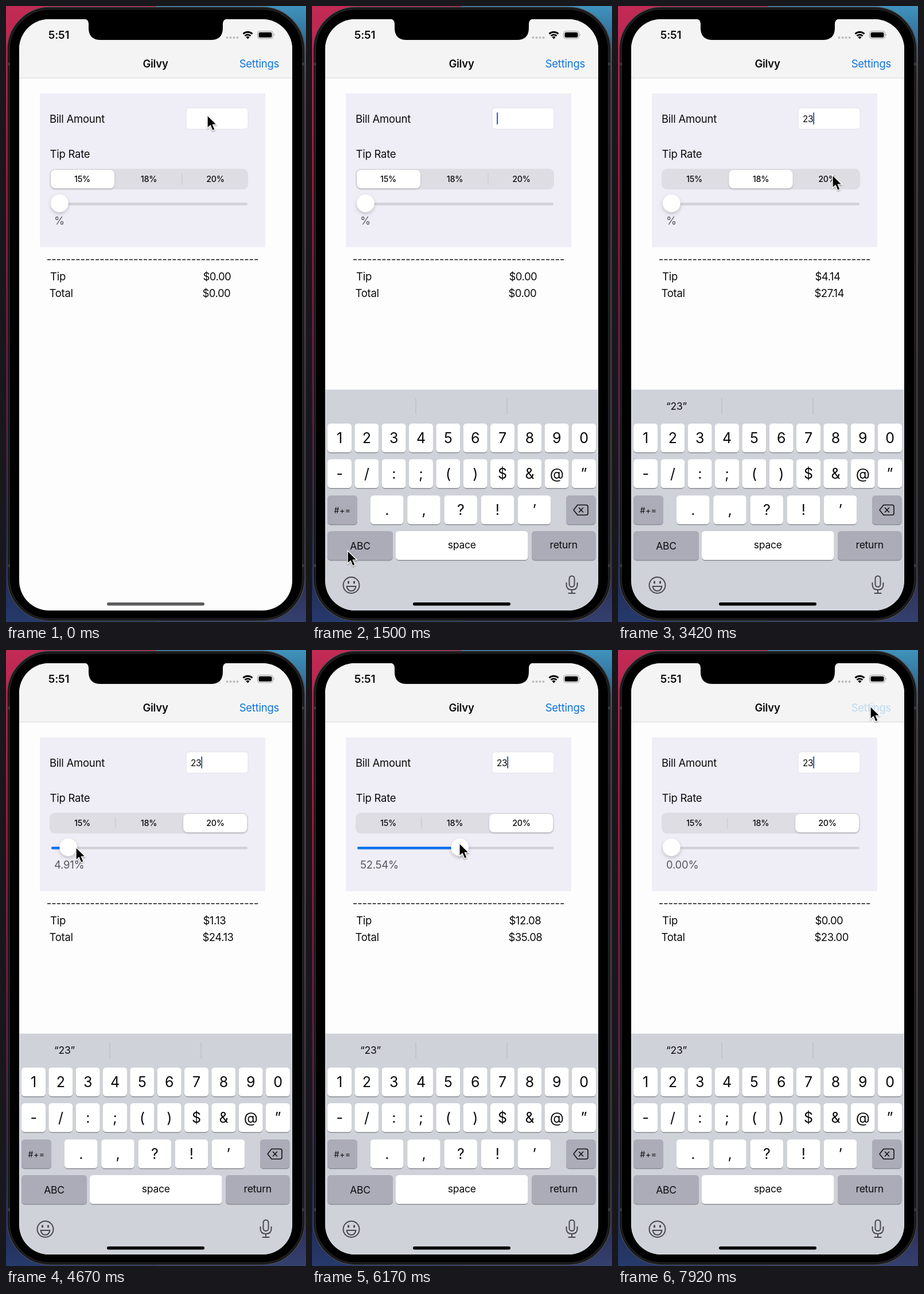
Animation of 523x1071 px, one loop 8000 ms. Source, as an HTML page:

```html
<!DOCTYPE html>
<html lang="en">
<head>
<meta charset="utf-8">
<title>Tip calculator</title>
<style>
  html, body { margin: 0; width: 100%; height: 100%; overflow: hidden; background: #000; }
  svg { display: block; width: 523px; height: 1071px; }
  text { font: 18.5px Inter, sans-serif; letter-spacing: -.25px; fill: #0b0b0d; white-space: pre; }
  .mid { text-anchor: middle; }
  .bold { font-weight: 600; }
  .money { letter-spacing: -.5px; }
  .seg { font-size: 14.3px; font-weight: 500; }
  .glyph { font-size: 25px; }
  .word { font-size: 17.5px; }
  .small { font-size: 14px; letter-spacing: .5px; }
  .line { fill: none; stroke: #48494d; stroke-width: 2; stroke-linecap: round; stroke-linejoin: round; }
</style>
</head>
<body>
<svg viewBox="0 0 523 1071">
  <defs>
    <linearGradient id="left" x2="0" y2="1">
      <stop offset="0" stop-color="#c22b55"/><stop offset=".3" stop-color="#a50f35"/>
      <stop offset=".6" stop-color="#5a1236"/><stop offset=".85" stop-color="#1c1c40"/>
      <stop offset="1" stop-color="#263a6c"/>
    </linearGradient>
    <linearGradient id="right" x2="0" y2="1">
      <stop offset="0" stop-color="#3f93bd"/><stop offset=".08" stop-color="#2b5c85"/>
      <stop offset=".13" stop-color="#8c1839"/><stop offset=".6" stop-color="#6a1438"/>
      <stop offset=".9" stop-color="#2a2850"/><stop offset="1" stop-color="#34406e"/>
    </linearGradient>
    <clipPath id="screen"><rect x="23" y="23" width="476" height="1028" rx="52"/></clipPath>
    <filter id="soft" x="-50%" y="-50%" width="200%" height="200%">
      <feDropShadow dx="0" dy="3" stdDeviation="3" flood-opacity=".2"/>
    </filter>
    <filter id="pillShadow" x="-20%" y="-30%" width="140%" height="160%">
      <feDropShadow dx="0" dy="1.5" stdDeviation="1.5" flood-opacity=".22"/>
    </filter>
    <filter id="arrowShadow" x="-50%" y="-50%" width="200%" height="200%">
      <feDropShadow dx="0" dy="1.5" stdDeviation="1.2" flood-opacity=".35"/>
    </filter>
  </defs>

  <rect width="262" height="1071" fill="url(#left)"/>
  <rect x="261" width="262" height="1071" fill="url(#right)"/>
  <rect x="2.5" y="2" width="518" height="1067" rx="74" fill="#000" stroke="#48484b" stroke-width="1.5"/>
  <rect x="5.5" y="5" width="512" height="1061" rx="71" fill="none" stroke="#1f1f21" stroke-width="3"/>
  <path d="M2 101h5M516 101h5M2 973h5M516 973h5" stroke="#39393c" stroke-width="5"/>

  <g clip-path="url(#screen)">
    <rect x="23" y="23" width="476" height="1028" fill="#fefdfe"/>
    <rect x="23" y="23" width="476" height="102" fill="#f5f4f5"/>
    <path d="M23 125h476" stroke="#d3d2d4"/>
    <path d="M135 22q9 1 9 9v7q0 21 21 21h192q21 0 21-21v-7q0-8 9-9z"/>
    <text class="mid bold" x="92" y="57" style="font-size:19px">5:51</text>
    <text class="mid bold" x="260.5" y="107">Gilvy</text>
    <text id="settings" x="476" y="107" text-anchor="end">Settings</text>
    <path d="M385.500 55h20" stroke="#bcbbbd" stroke-width="4" stroke-linecap="round" stroke-dasharray="0 6"/>
    <path d="M413.500 48.500a11.500 11.500 0 0 1 16 0M416.500 52a7 7 0 0 1 10 0" fill="none" stroke="#000" stroke-width="2.800"/>
    <path d="M421.500 57.500l-3-3.200a4.300 4.300 0 0 1 6 0z"/>
    <rect x="438.500" y="43.700" width="27" height="13" rx="4" fill="none" stroke="#98989a"/>
    <rect x="440.500" y="45.700" width="23" height="9" rx="2.500"/>
    <path d="M467 48q2 2 0 4z" fill="#98989a"/>

    <rect x="59" y="152" width="393" height="267.500" fill="#efedf5"/>
    <text x="76" y="203">Bill Amount</text>
    <rect x="314" y="177" width="108" height="37" rx="5.500" fill="#fff" stroke="#e2e0e7"/>
    <text id="bill" x="322" y="201.500" style="font-size:15.300px"></text>
    <rect id="caret" y="185" width="2.200" height="21" rx="1" fill="#3e62c6"/>
    <text x="76.500" y="264">Tip Rate</text>
    <rect x="76" y="283" width="346" height="36" rx="9" fill="#dedde4"/>
    <path id="sep0" d="M191 291v20" stroke="#c5c4cc"/>
    <path id="sep1" d="M307 291v20" stroke="#c5c4cc"/>
    <rect id="pill" y="285" width="111" height="32" rx="8" fill="#fff" filter="url(#pillShadow)"/>
    <text class="mid seg" x="133" y="306">15%</text>
    <text class="mid seg" x="249" y="306">18%</text>
    <text class="mid seg" x="365" y="306">20%</text>
    <rect x="79" y="342" width="342" height="4.500" rx="2.200" fill="#d2d1d8"/>
    <rect id="fill" x="79" y="342" height="4.500" rx="2.200" fill="#0b74ee"/>
    <circle id="knob" cy="343" r="15.300" fill="#fff" filter="url(#soft)"/>
    <text id="percent" x="84" y="380" style="fill:#57565c"></text>
    <path d="M72 441h369" stroke="#111" stroke-width="1.700" stroke-dasharray="6 2.400"/>
    <text x="77" y="477">Tip</text>
    <text x="75.500" y="506">Total</text>
    <text id="tip" class="money" x="343.500" y="477"></text>
    <text id="total" class="money" x="342.500" y="506"></text>

    <g id="keyboard">
      <rect x="23.500" y="667" width="475" height="390" fill="#cfd2d9"/>
      <path d="M181 682v28M340 682v28" stroke="#b5b8bf"/>
      <g id="letters"></g>
      <g id="symbols"></g>
      <text id="guess" class="mid word" x="102" y="702"></text>
      <g id="shared"></g>
      <g class="line">
        <path d="M463 867.500h15q3 0 3 3v11.500q0 3-3 3h-15l-7-8.700zM465.500 872.500l7 7.500M472.500 872.500l-7 7.500" style="stroke:#111;stroke-width:1.600"/>
        <circle cx="68.500" cy="1007" r="14"/>
        <path d="M60.500 1009h16q-1.500 8-8 8t-8-8z"/>
        <path d="M63.500 1001v2M73.500 1001v2" stroke-width="3"/>
        <rect x="448.500" y="991" width="9" height="19" rx="4.500"/>
        <path d="M443.500 1003v3q0 9 9.500 9t9.500-9v-3M453 1015v6M447.500 1021h11"/>
      </g>
      <g id="popup">
        <path d="M-29 664q0-8 8-8h42q8 0 8 8v38q0 8-5 13q-3 4-3 11v44q0 6-6 6h-30q-6 0-6-6v-44q0-7-3-11q-5-5-5-13z" fill="#fff" filter="url(#soft)"/>
        <text id="popupText" class="mid" y="703" style="font-size:36px"></text>
      </g>
    </g>
    <rect id="home" x="176" y="1037" width="170" height="5.500" rx="2.700"/>
  </g>
  <path id="cursor" d="M0 0v22.500l5.200-4.800 3.700 8.800 4.200-1.800-3.700-8.500h7z" stroke="#fff" stroke-width="1.300" filter="url(#arrowShadow)"/>
</svg>

<script>
const $ = id => document.getElementById(id);
const LOOP = 8000, STEP = 1000 / 12, PITCH = 47.33;

function key(x, y, w, label, style = 'glyph', fill = '#fff', base = 34) {
  const box = (dy, color) => `<rect x="${x}" y="${y + dy}" width="${w}" height="50" rx="5.5" fill="${color}"/>`;
  return box(1.4, '#8b8d94') + box(0, fill) +
    `<text class="mid ${style}" x="${x + w / 2}" y="${y + base}">${label}</text>`;
}
const GREY = '#abacb7';
const row = (labels, x, y, pitch = PITCH, w = 42) =>
  [...labels].map((c, i) => key(x + i * pitch, y, w, c === '&' ? '&amp;' : c)).join('');
const suggestions = [['I', 102], ['The', 261], ['I’m', 420]]
  .map(([word, x]) => `<text class="mid word" x="${x}" y="702">${word}</text>`).join('');

$('letters').innerHTML = suggestions + row('QWERTYUIOP', 27, 726) + row('ASDFGHJKL', 50.7, 788) +
  row('ZXCVBNM', 98, 851) + key(27, 851, 52, '⇧') + key(27, 913, 114, '123', 'word', GREY, 32);
$('symbols').innerHTML = row('1234567890', 27, 726) + row('-/:;()$&@”', 27, 788) +
  row('.,?!’', 102, 851, 64.2, 57.5) + key(27, 851, 52, '#+=', 'small', GREY, 31) +
  key(27, 913, 114, 'ABC', 'word', GREY, 32);
$('shared').innerHTML = key(443, 851, 51.5, '', '', GREY) + key(146, 913, 230.5, 'space', 'word', '#fff', 30) +
  key(383, 913, 111.5, 'return', 'word', GREY, 30);

// Keyframes: [time, ...values]
const pointer = [
  [667, 351, 190], [1417, 62, 947], [1583, 62, 947], [1917, 93, 755], [2000, 93, 755],
  [2167, 141, 752], [2417, 141, 752], [2583, 141, 335], [2833, 247, 300], [3000, 247, 300],
  [3333, 374, 294], [3667, 374, 294], [4333, 108, 343], [4500, 108, 343], [4667, 122, 343],
  [5833, 244, 338], [5917, 244, 338], [6167, 257, 336], [6667, 422, 336], [6833, 422, 336],
  [7583, 88, 336], [7667, 88, 336], [7917, 440, 98]
];
const slider = [
  [4500, 0], [4667, 4.91], [5833, 48.2], [5917, 48.2], [6167, 52.54], [6667, 100], [6833, 100], [7583, 0]
];
const segment = [[2833, 0], [3083, 1], [3500, 1], [3750, 2]];
const slide = [[0, 384], [250, 0]];

function at(frames, t) {
  const next = frames.findIndex(f => f[0] > t);
  if (next === 0) return frames[0].slice(1);
  if (next < 0) return frames[frames.length - 1].slice(1);
  const a = frames[next - 1], b = frames[next];
  const p = (t - a[0]) / (b[0] - a[0]), e = p * p * (3 - 2 * p);
  return a.slice(1).map((v, i) => v + (b[i + 1] - v) * e);
}

function caretOpacity(t) {
  if (t < 80) return 0;
  if (t < 1000) return Math.max(0, Math.min(1, (600 - t) / 150));
  if (t < 2500) return 1;
  const phase = t % 1100;
  return Math.max(0, Math.min(1, phase / 100, (800 - phase) / 100));
}

const set = (id, attrs) => { for (const k in attrs) $(id).setAttribute(k, attrs[k]); };
const show = (id, on) => set(id, { opacity: on ? 1 : 0 });

function draw(t) {
  const bill = t < 1960 ? '' : t < 2240 ? '2' : '23';
  const [percent] = at(slider, t), [choice] = at(segment, t), [x, y] = at(pointer, t);
  const sliding = t > 4560;
  const rate = sliding ? percent : t < 2900 ? 15 : t < 3580 ? 18 : 20;
  const tip = bill * rate / 100, knob = 93.3 + percent * 3.13;

  $('bill').textContent = bill;
  $('percent').textContent = (sliding ? percent.toFixed(2) : '') + '%';
  $('tip').textContent = '$' + tip.toFixed(2);
  $('total').textContent = '$' + (+bill + tip).toFixed(2);
  $('guess').textContent = bill && `“${bill}”`;
  $('settings').style.fill = t > 7900 ? '#bcd9f0' : '#0f74dc';

  set('caret', { x: 322 + bill.length * 9, opacity: caretOpacity(t) });
  set('pill', { x: 78 + choice * 115.6 });
  show('sep0', choice > 1.5);
  show('sep1', choice < .5);
  set('knob', { cx: knob });
  set('fill', { width: percent > 0 ? knob - 79 : 0 });

  set('keyboard', { transform: `translate(0 ${at(slide, t)[0]})` });
  show('letters', t < 1450);
  show('symbols', t >= 1450);
  const pressed = t > 1900 && t < 2050 ? 2 : t > 2200 && t < 2350 ? 3 : 0;
  show('popup', pressed);
  set('popup', { transform: `translate(${48 + (pressed - 1) * PITCH} 0)` });
  $('popupText').textContent = pressed || '';
  set('home', { fill: t < 80 ? '#5c5c5e' : '#000' });
  set('cursor', { transform: `translate(${x} ${y})` });
}

function tick() {
  const t = performance.now() % LOOP;
  draw(Math.floor((t + 4) / STEP) * STEP);
  requestAnimationFrame(tick);
}
tick();
</script>
</body>
</html>
```
